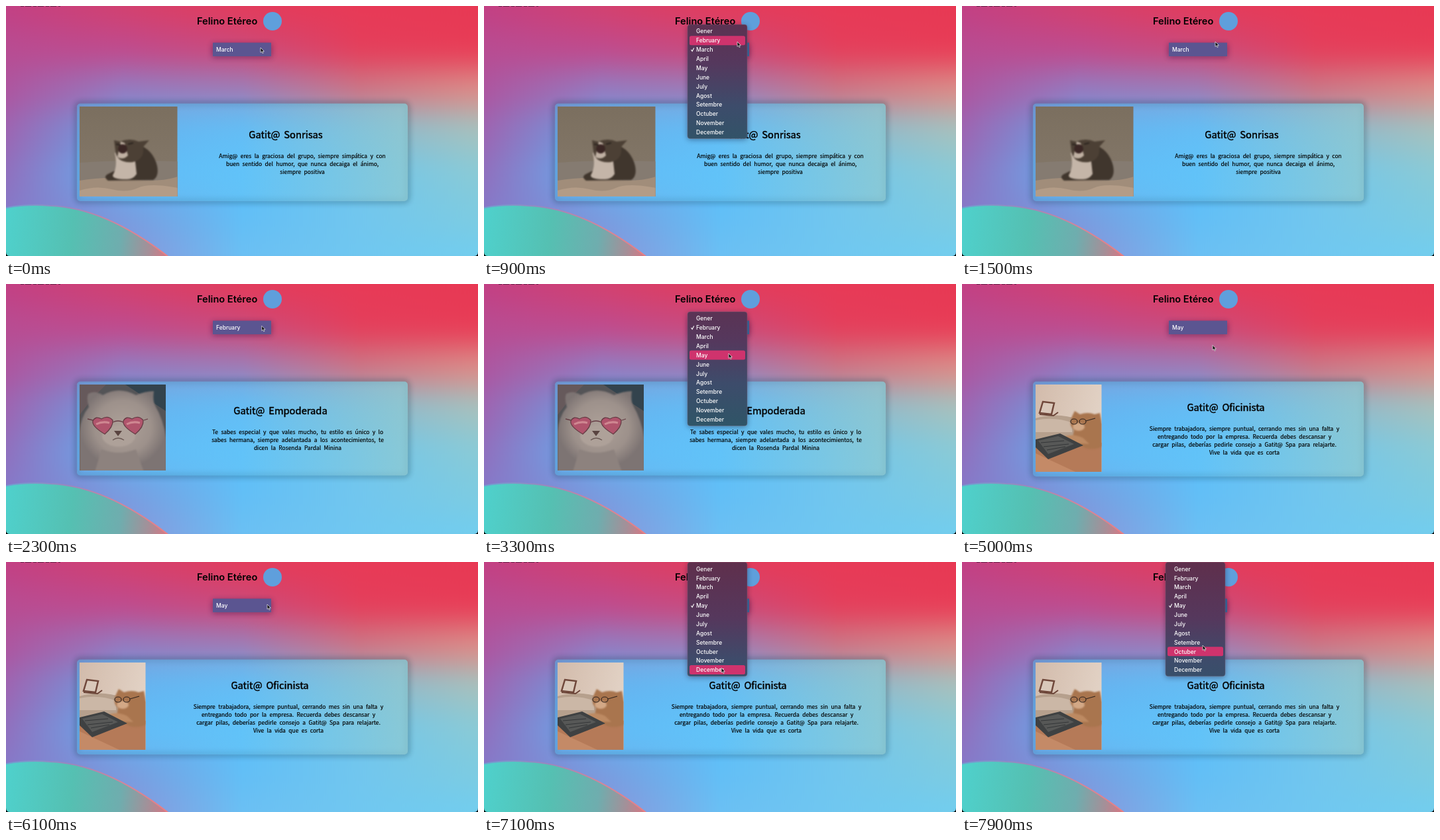
Recreate the animation shown at these times as an HTML page. Size 712 by 378 pixels, loop 8000 ms.

```html
<!DOCTYPE html>
<html lang="es">
<head>
<meta charset="utf-8">
<title>Felino Etéreo</title>
<style>
  html, body { margin: 0; width: 100%; height: 100%; overflow: hidden; background: #62bcf4; }
  svg { display: block; width: 712px; height: 378px; }
  .brand { font: 600 14.6px Inter, sans-serif; }
  .ui { font: 500 8.5px Inter, sans-serif; fill: #fff; }
  .copy { font: 400 8.45px "Noto Sans CJK JP", "Noto Sans CJK", sans-serif; word-spacing: .3em; text-anchor: middle; stroke: #000; stroke-width: .2; }
  .copy .title { font-size: 14.7px; stroke-width: .45; }
</style>
</head>
<body>
<svg id="stage" viewBox="0 0 712 378">
  <defs>
    <filter id="melt" filterUnits="userSpaceOnUse" x="-20" y="-150" width="752" height="680" color-interpolation-filters="sRGB">
      <feGaussianBlur stdDeviation="0 23"/>
    </filter>
    <filter id="soft" x="-30%" y="-60%" width="160%" height="220%"><feGaussianBlur stdDeviation="4"/></filter>
    <filter id="fuzz" x="-20%" y="-20%" width="140%" height="140%" color-interpolation-filters="sRGB"><feGaussianBlur stdDeviation="1.2"/></filter>
    <linearGradient id="hill" gradientUnits="userSpaceOnUse" x1="0" y1="345" x2="245" y2="372">
      <stop offset="0" stop-color="#4fd0cb"/>
      <stop offset=".4" stop-color="#55c0b2"/>
      <stop offset=".7" stop-color="#6fadae"/>
      <stop offset=".88" stop-color="#a58f98"/>
      <stop offset="1" stop-color="#d97682"/>
    </linearGradient>
    <linearGradient id="rim" gradientUnits="userSpaceOnUse" x1="0" y1="0" x2="245" y2="0">
      <stop offset="0" stop-color="#6f9fd0"/>
      <stop offset=".4" stop-color="#9c86bd"/>
      <stop offset=".75" stop-color="#d98497"/>
      <stop offset="1" stop-color="#e87f84"/>
    </linearGradient>
    <linearGradient id="glass">
      <stop offset="0" stop-color="#5fc5fc" stop-opacity=".45"/>
      <stop offset=".5" stop-color="#66c5f6" stop-opacity=".55"/>
      <stop offset="1" stop-color="#8cc9d3" stop-opacity=".8"/>
    </linearGradient>
    <linearGradient id="menuFill" gradientUnits="userSpaceOnUse" x1="0" y1="0" x2="0" y2="215">
      <stop offset="0" stop-color="#5f2f4c"/>
      <stop offset=".4" stop-color="#55385d"/>
      <stop offset=".7" stop-color="#3d4c6b"/>
      <stop offset="1" stop-color="#2f5567"/>
    </linearGradient>
    <linearGradient id="wall" x2="0" y2="1">
      <stop offset="0" stop-color="#7b6f5f"/><stop offset="1" stop-color="#85796b"/>
    </linearGradient>
    <linearGradient id="room" x2="1" y2=".3">
      <stop offset="0" stop-color="#d2bbab"/><stop offset="1" stop-color="#e2d2c5"/>
    </linearGradient>
    <radialGradient id="fur" cy=".45">
      <stop offset="0" stop-color="#aea199"/><stop offset=".65" stop-color="#9d918b"/><stop offset="1" stop-color="#7d7473"/>
    </radialGradient>
    <clipPath id="photoClip"><rect id="photoBox" x="111" y="152"/></clipPath>
  </defs>

  <g id="sky" filter="url(#melt)"></g>
  <path d="M-4 306Q30 299 66 302C130 304 190 336 246 380H-4Z" fill="url(#hill)" stroke="url(#rim)" stroke-width="2"/>
  <path d="M22 .5h60" stroke="#301428" stroke-dasharray="5 2 9 3" opacity=".6"/>
  <path d="M0 372q0 6 6 6H0ZM712 372q0 6-6 6h6Z"/>

  <text class="brand" x="288" y="28">Felino Etéreo</text>
  <circle cx="402" cy="23" r="14" fill="#5f9fdc"/>

  <rect x="311" y="57" width="90" height="21" fill="#20103c" opacity=".4" filter="url(#soft)"/>
  <rect id="select" x="312" y="55.5" width="88" height="20.5"/>
  <text id="month" class="ui" x="317" y="69"></text>

  <rect id="cardShade" x="107" y="147.5" width="499" rx="5" fill="none" stroke="#123" stroke-width="5" opacity=".38" filter="url(#soft)"/>
  <rect id="cardBody" x="107" y="147.5" width="499" rx="5" fill="url(#glass)"/>

  <g clip-path="url(#photoClip)">
    <g class="photo">
      <rect x="111" y="152" width="148" height="136" fill="url(#wall)"/>
      <path d="M111 237q60-5 148-2v54H111Z" fill="#857b71"/>
      <path d="M111 264q40-7 80-2t68-4v31H111Z" fill="#a18d7a"/>
      <path d="M111 279q25-8 48-2t40-2 60 0v14H111Z" fill="#b39c87"/>
      <g filter="url(#fuzz)">
        <path d="M196 208q26 8 32 34 3 16-6 21l-68 1q-8-6 0-10l20-10Z" fill="#40362d"/>
        <path d="M164 222q20-6 30 4l3 28q-6 9-16 8-20 0-20-6 8-14 3-34Z" fill="#c4b5a8"/>
        <path d="M163 203l9 2q15-6 28 0l16-2-9 10q2 20-16 23-24 2-26-17Z" fill="#4c4035"/>
        <path d="M173 205l6 2 5 19q-8 8-16 2Z" fill="#c0b1a3"/>
        <ellipse cx="176" cy="216" rx="7" ry="7" fill="#3a2624"/>
        <path d="M166 209l7 1M184 209l8-2" stroke="#2c241f" stroke-width="2"/>
      </g>
    </g>
    <g class="photo">
      <rect x="111" y="152" width="130" height="130" fill="#545457"/>
      <path d="M111 152h40l-20 20-20 26Z" fill="#66595b"/>
      <path d="M180 152h61v40Z" fill="#33434d"/>
      <g filter="url(#fuzz)">
        <path d="M124 166q10-6 22 2 24-14 50 0 14-6 27-6-2 14 2 22 12 20 17 50v50H111v-60q2-24 14-38-4-12-1-20Z" fill="url(#fur)"/>
        <ellipse cx="170" cy="230" rx="25" ry="16" fill="#aea199"/>
        <path d="M144 250q26 10 52 0l12 34h-74Z" fill="#8d827e"/>
      </g>
      <g fill="#b0546c" stroke="#653c44" stroke-width="1.3">
        <path id="lens" d="M149 227q-20-12-18-20 4-8 13-3 10-6 17 2 1 10-12 21Z"/>
        <use href="#lens" x="46"/>
        <path d="M161 209q8-4 16 0M131 206l-8-2M208 206l6-2" fill="none"/>
      </g>
      <path d="M136 212q10-5 20-2M182 212q10-5 20-2" stroke="#cf8791" stroke-width="3" fill="none"/>
      <path d="M163 222h12l-6 8Z" fill="#594340"/>
      <path d="M161 236q8-6 17 0" stroke="#6a5853" stroke-width="1.3" fill="none"/>
    </g>
    <g class="photo">
      <rect x="111" y="152" width="100" height="132" fill="url(#room)"/>
      <path d="M111 203q32-10 66 2l34 6v34H111Z" fill="#b6a08d"/>
      <path d="M111 206q30-6 55 4v14h-55Z" fill="#cbb7a6"/>
      <path d="M122 178l17 2-4 17-18-2Z" fill="#d9c8ba" stroke="#70483b" stroke-width="2.5"/>
      <path d="M117 197l21 2 7-5" stroke="#6a4437" stroke-width="2" fill="none"/>
      <path d="M111 240l60-8 40 8v44H111Z" fill="#b57a58"/>
      <path d="M111 256l60 28h-60Z" fill="#c48a67"/>
      <g filter="url(#fuzz)">
        <path d="M166 200l4-8 8 5q12-4 22 0l8-2 3 15v36q-18 8-32-2l-13-7 3-16q-9-8-3-21Z" fill="#a9754e"/>
        <ellipse cx="176" cy="216" rx="9" ry="6" fill="#d3a886"/>
        <path d="M153 231q15-6 30 2l9 9-36-2Z" fill="#bd8a62"/>
      </g>
      <g fill="none" stroke="#33251f" stroke-width="1.2">
        <ellipse cx="169" cy="208" rx="5" ry="4"/><ellipse cx="182" cy="208" rx="5" ry="4"/><path d="M187 207l14-4"/>
      </g>
      <path d="M111 235l37-9 35 18-53 21-19-18Z" fill="#3f4142"/>
      <path d="M115 237l30-7 24 12-39 15Z" fill="#575857"/>
      <path d="M119 240l35-3M123 246l38-4M128 251l28-5" stroke="#343638"/>
    </g>
  </g>

  <g id="copy" class="copy"></g>

  <g id="menu">
    <rect x="307" y="2" width="90" height="172" rx="4" fill="#101020" opacity=".4" filter="url(#soft)"/>
    <rect id="menuBack" x="307" width="90" height="172.5" rx="4" fill="url(#menuFill)" stroke="#83697f" stroke-opacity=".5" stroke-width=".7"/>
    <rect id="hover" x="310" width="84" height="14" rx="2.5" fill="#cf336d"/>
    <path id="check" fill="none" stroke="#fff" stroke-width="1.1"/>
    <g id="items" class="ui"></g>
  </g>
  <path id="cursor" d="M0 0V7.4L1.8 5.8 3 8.6 4.3 8 3.1 5.4H5.4Z" fill="#111" stroke="#eee" stroke-width=".7"/>
</svg>

<script>
const $ = id => document.getElementById(id);
const set = (el, attrs) => { for (const k in attrs) el.setAttribute(k, attrs[k]); };
const LOOP = 8000, STEP = 100, ROW = 13.87, SELECT_Y = 66;

// Horizontal colour bands, melted together vertically.
const bands = [
  "c33f83 d3406f e33b5b e83956 e83853",
  "b94b91 c1498b cd4878 e53d5a e93b55",
  "ae559f 957abf 9f7cb6 cd7585 dc8c88",
  "9d65b2 68a2e6 60b4f4 88b8d0 a5c2bf",
  "9070be 62b2f3 5bc0fc 72c5ea 8acad6",
  "8678c8 789cdf 62bef6 72c6ee 7ecbe0",
  "8a7ccc 8a92da 6bbff3 70c7f0 72cdee"
];
const BAND = 63;
$("sky").innerHTML = bands.map((row, i) => {
  const stops = row.split(" ").map((c, j) => `<stop offset="${j / 4}" stop-color="#${c}"/>`).join("");
  const first = i === 0, last = i === bands.length - 1;
  const y = first ? -120 : (i - .5) * BAND;
  const h = first ? 120 + BAND / 2 : last ? 180 : BAND;
  return `<linearGradient id="band${i}">${stops}</linearGradient>
    <rect x="0" y="${y}" width="712" height="${h}" fill="url(#band${i})"/>`;
}).join("");

const months = ["Gener", "February", "March", "April", "May", "June", "July",
  "Agost", "Setembre", "Octuber", "November", "December"];
$("items").innerHTML = months.map((m, i) =>
  `<text x="320" y="${(13.4 + i * ROW).toFixed(2)}">${m}</text>`).join("");

const cards = [
  { from: 0, month: 2, height: 147.5, photo: [147.5, 136], title: "Gatit@ Sonrisas", titleAt: [422, 199.5], textAt: [447, 230.2],
    lines: ["Amig@ eres la graciosa del grupo, siempre simpática y con",
      "buen sentido del humor, que nunca decaiga el ánimo,", "siempre positiva"] },
  { from: 1600, month: 1, height: 142, photo: [130, 130], title: "Gatit@ Empoderada", titleAt: [414, 196.5], textAt: [440, 226.8],
    lines: ["Te sabes especial y que vales mucho, tu estilo es único y lo",
      "sabes hermana, siempre adelantada a los acontecimientos, te", "dicen la Rosenda Pardal Minina"] },
  { from: 4000, month: 4, height: 143.5, photo: [99.5, 132], title: "Gatit@ Oficinista", titleAt: [398, 191.5], textAt: [426, 221.8],
    lines: ["Siempre trabajadora, siempre puntual, cerrando mes sin una falta y",
      "entregando todo por la empresa. Recuerda debes descansar y",
      "cargar pilas, deberías pedirle consejo a Gatit@ Spa para relajarte.", "Vive la vida que es corta"] }
];
const openings = [[300, 1400], [2900, 3900], [6300, LOOP]];

// Cursor path: time, x, y.
const path = [
  [0, 384, 63], [500, 384, 63], [900, 382, 54], [1800, 382, 54], [2400, 386, 64], [2900, 386, 64],
  [3200, 369, 104], [3300, 369, 105], [3900, 369, 105], [4500, 378, 92.5], [5000, 378, 92.5],
  [5600, 394, 64], [6400, 394, 64], [7000, 358, 159], [7100, 358, 160],
  [7600, 358, 160], [7900, 363, 126]
];
function cursorAt(t) {
  const n = path.findIndex(p => p[0] > t);
  if (n < 0) return path[path.length - 1].slice(1);
  const [a, b] = [path[n - 1], path[n]];
  const u = (t - a[0]) / (b[0] - a[0]), e = u * u * (3 - 2 * u);
  return [a[1] + (b[1] - a[1]) * e, a[2] + (b[2] - a[2]) * e];
}

const photos = document.querySelectorAll(".photo");
let shown = -1;
function showCard(index) {
  if (index === shown) return;
  shown = index;
  const c = cards[index], [tx, ty] = c.titleAt, [x, y] = c.textAt;
  photos.forEach((p, i) => p.style.display = i === index ? "" : "none");
  set($("photoBox"), { width: c.photo[0], height: c.photo[1] });
  set($("cardShade"), { height: c.height });
  set($("cardBody"), { height: c.height });
  $("month").textContent = months[c.month];
  $("copy").innerHTML = `<text class="title" x="${tx}" y="${ty}">${c.title}</text>` +
    c.lines.map((l, i) => `<text x="${x}" y="${y + i * 12.1}">${l}</text>`).join("");
}

function showMenu(t, month) {
  const open = openings.some(([a, b]) => t >= a && t < b);
  $("menu").style.display = open ? "" : "none";
  set($("select"), { fill: open ? "#3f6c9f" : "#5b5591" });
  if (!open) return;
  const top = SELECT_Y - 10.2 - month * ROW;
  // The highlight trails the pointer by one step.
  const pointer = cursorAt(t - STEP)[1];
  const row = Math.max(0, Math.min(11, Math.floor((pointer - top - 3.3) / ROW)));
  const mid = 10.2 + month * ROW;
  set($("menu"), { transform: `translate(0 ${top})` });
  set($("menuFill"), { gradientTransform: `translate(0 ${-top})` });
  set($("hover"), { y: 3.2 + row * ROW });
  set($("check"), { d: `M312.5 ${mid}l1.6 2.4 2.6-5` });
}

function render(time) {
  const t = Math.floor((time % LOOP) / STEP) * STEP;
  const index = cards.filter(c => c.from <= t).length - 1;
  showCard(index);
  showMenu(t, cards[index].month);
  set($("cursor"), { transform: `translate(${cursorAt(t)})` });
}

const start = performance.now();
function tick() {
  render(performance.now() - start);
  requestAnimationFrame(tick);
}
tick();
</script>
</body>
</html>
```
